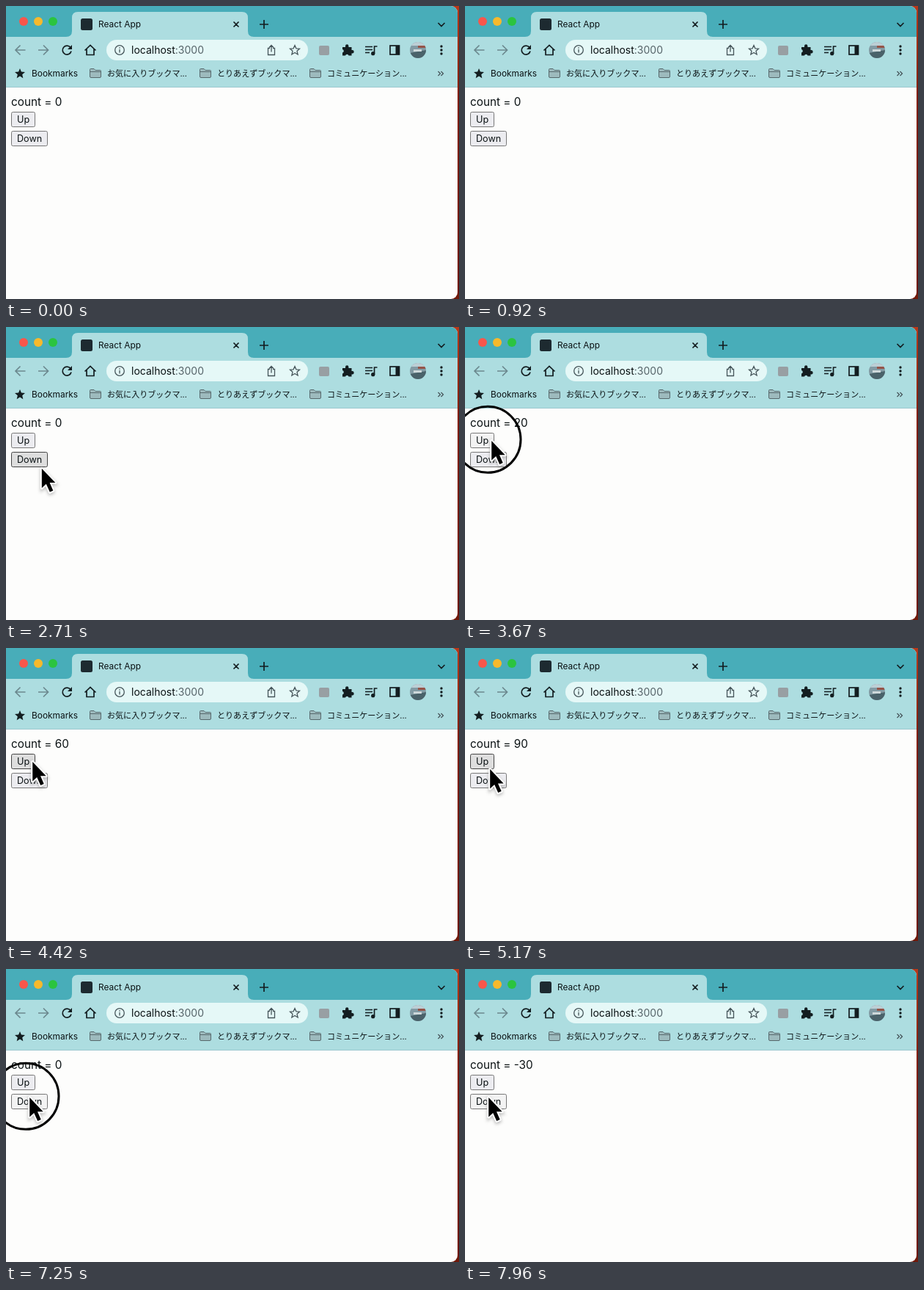
Animation of 618x399 px, one loop 8000 ms. Source, as an HTML page:

```html
<!DOCTYPE html>
<html lang="ja">
<head>
<meta charset="utf-8">
<title>Counter</title>
<style>
  html, body { margin: 0; width: 100%; height: 100%; overflow: hidden; background: #7a1e0a; }
  svg { display: block; width: 618px; height: 399px; }
  text { font-family: Inter, "Noto Sans CJK JP", "Noto Sans CJK", sans-serif; fill: #0b1214; }
  .line { fill: none; stroke: #131d20; stroke-width: 1.7; }
  .dim { stroke: #6c898f; }
  .thin { stroke-width: 1.3; stroke: #46555a; }
  .dark { fill: #131d20; }
  .mark { font-size: 11.05px; }
</style>
</head>
<body>
<svg viewBox="0 0 618 399">
  <defs>
    <linearGradient id="desk" x2="0" y2="1">
      <stop offset="0" stop-color="#b8391a"/>
      <stop offset=".3" stop-color="#84200c"/>
      <stop offset="1" stop-color="#70190a"/>
    </linearGradient>
    <clipPath id="win"><rect x="-12" width="628" height="399" rx="9"/></clipPath>
    <clipPath id="face"><circle cx="562" cy="60" r="11"/></clipPath>
    <filter id="soft" x="-60%" y="-40%" width="220%" height="200%">
      <feGaussianBlur stdDeviation="2"/>
    </filter>
    <path id="arrow" d="M0 0V26.5L6 21L11 32L15.500 30L10.800 19.300H18.500Z"/>
    <g id="folder">
      <path d="M.5 11V1.500Q.5 .5 1.500 .5H6L8 2.500H14.500Q15.500 2.500 15.500 3.500V11Q15.500 12.500 14 12.500H2Q.5 12.500 .5 11Z" fill="#9dbabd" stroke="#56686c"/>
      <path d="M.5 4.500H15.500" stroke="#56686c"/>
    </g>
  </defs>

  <rect width="618" height="399" fill="url(#desk)"/>
  <g clip-path="url(#win)">
    <rect width="616" height="399" fill="#fdfdfc"/>
    <rect width="616" height="42" fill="#48adb9"/>
    <rect y="42" width="616" height="68" fill="#addde0"/>
    <rect y="110" width="616" height="1" fill="#9cc8cf"/>
    <path d="M82 42Q90 42 90 34V16Q90 8 98 8H322Q330 8 330 16V34Q330 42 338 42Z" fill="#addde0"/>

    <circle cx="24" cy="21" r="6" fill="#f9564b"/>
    <circle cx="44" cy="21" r="6" fill="#f7b92c"/>
    <circle cx="64" cy="21" r="6" fill="#2bc43f"/>
    <rect x="102" y="17" width="16" height="16" rx="2.500" fill="#1d2a30"/>
    <text x="126" y="29" font-size="11.9">React App</text>
    <path class="line" d="M310.500 21.500L317.500 28.500M317.500 21.500L310.500 28.500M346 25H358M352 19V31M589.500 23L594 27.500L598.500 23"/>

    <path class="line dim" d="M26.500 60H13M19.500 53.500L13 60L19.500 66.500M44 60H57.500M51 53.500L57.500 60L51 66.500"/>
    <path class="line" d="M88 56.500A6 6 0 1 0 89 61.500"/>
    <path class="dark" d="M90 53V59H84Z"/>
    <path class="line" d="M107.500 60.500L115 53.500L122.500 60.500M110 58.500V66.500H120V58.500"/>

    <rect x="137" y="46" width="275" height="28" rx="14" fill="#e5f8f7"/>
    <circle class="line thin" cx="155" cy="60" r="6.300"/>
    <path class="line thin" d="M155 59V63.500M155 56.300V57.800"/>
    <text x="171" y="65" font-size="14">localhost<tspan fill="#566469">:3000</tspan></text>
    <path class="line thin" d="M360 57.500H357.500V66.500H366.500V57.500H364M362 62.500V53.500M359 56.500L362 53.500L365 56.500"/>
    <path class="line thin" d="M394 53.500L395.900 57.800L400.500 58.200L397 61.300L398.100 66L394 63.500L389.900 66L391 61.300L387.500 58.200L392.100 57.800Z"/>

    <rect x="427" y="54" width="14" height="13" rx="2" fill="#989fa3"/>
    <path class="dark" d="M459 56H463V54.500A2.200 2.200 0 0 1 467.400 54.500V56H471.500V60H472.500A2.200 2.200 0 0 1 472.500 64.400H471.500V67.500H467.500A2.300 2.300 0 0 0 463 67.500H459V63.500A2.300 2.300 0 0 0 459 59Z"/>
    <path class="line" d="M490 55.500H500M490 59.500H500M490 63.500H496M502.500 65V55H506.500"/>
    <circle class="dark" cx="500.700" cy="64.700" r="2.600"/>
    <rect class="line" x="524" y="54" width="12.500" height="12"/>
    <rect class="dark" x="531.500" y="54" width="5" height="12"/>
    <g clip-path="url(#face)">
      <rect x="551" y="49" width="22" height="22" fill="#829ba4"/>
      <rect x="551" y="49" width="22" height="5" fill="#bccfd5"/>
      <rect x="562" y="54" width="11" height="3" fill="#945448"/>
      <path d="M551 64L573 60V71H551Z" fill="#4a626a"/>
      <rect x="556" y="59" width="11" height="3" fill="#ced8da"/>
    </g>
    <g class="dark">
      <circle cx="594" cy="55" r="1.700"/><circle cx="594" cy="60" r="1.700"/><circle cx="594" cy="65" r="1.700"/>
    </g>

    <path class="dark" d="M19 85L20.900 89.600L26 90L22.200 93.300L23.300 98.200L19 95.600L14.700 98.200L15.800 93.300L12 90L17.100 89.600Z"/>
    <text x="35" y="96" font-size="11.9">Bookmarks</text>
    <use href="#folder" x="114" y="85"/>
    <text class="mark" x="138" y="96">お気に入りブックマ...</text>
    <use href="#folder" x="264" y="85"/>
    <text class="mark" x="288" y="96">とりあえずブックマ...</text>
    <use href="#folder" x="414" y="85"/>
    <text class="mark" x="438" y="96">コミュニケーション...</text>
    <path class="line thin" d="M589.500 89L592.500 92L589.500 95M593.500 89L596.500 92L593.500 95"/>

    <text id="count" x="7" y="136" font-size="15.3"></text>
    <rect id="up" x="7.500" y="144.500" width="32" height="20" rx="2"/>
    <text x="15" y="159" font-size="12.7">Up</text>
    <rect id="down" x="7.500" y="170.500" width="49" height="20" rx="2"/>
    <text x="15" y="185" font-size="12.6">Down</text>

    <g id="pointer">
      <circle id="ring" cx="-4" cy=".3" r="45" fill="none" stroke="#000" stroke-width="3"/>
      <g transform="translate(1.2 2)">
        <use href="#arrow" y="2" fill="#777" stroke="#777" stroke-width="4" opacity=".5" filter="url(#soft)"/>
        <use href="#arrow" stroke="#fff" stroke-width="4" stroke-linejoin="round" paint-order="stroke"/>
      </g>
    </g>
  </g>
</svg>
<script>
const LOOP = 8000, HOLD = 100, RING_LAG = 35;
const $ = id => document.getElementById(id);

const upPresses = Array.from({ length: 9 }, (_, k) => 3190 + 215 * k);
const downPresses = Array.from({ length: 13 }, (_, k) => 5300 + 212 * k + 30 * Math.max(0, k - 9));

// time, x, y of the pointer tip
const path = [
  [1450, 125, 405], [1750, 98, 337], [1960, 86, 299], [2400, 64, 240], [2950, 35, 153],
  [5040, 35, 153], [5170, 33, 163], [5280, 31, 173], [LOOP, 31, 173]
];

function tipAt(t) {
  const i = path.findIndex(p => p[0] >= t);
  if (i < 1) return path[0].slice(1);
  const [t0, x0, y0] = path[i - 1], [t1, x1, y1] = path[i];
  const u = (t - t0) / (t1 - t0);
  return [x0 + (x1 - x0) * u, y0 + (y1 - y0) * u];
}

const held = (list, t) => list.some(p => t >= p && t < p + HOLD);
const released = (list, t) => list.filter(p => t >= p + HOLD).length;

function paintButton(id, right, top, [x, y], active) {
  const hover = x >= 7 && x <= right && y >= top && y <= top + 21;
  $(id).setAttribute("fill", active ? "#f3f3f3" : hover ? "#dedede" : "#ececf0");
  $(id).setAttribute("stroke", hover && !active ? "#444" : "#777");
}

function draw(t) {
  const tip = tipAt(t);
  const ringTime = t - RING_LAG;
  $("count").textContent = "count = " + 10 * (released(upPresses, t) - released(downPresses, t));
  paintButton("up", 40, 144, tip, held(upPresses, t));
  paintButton("down", 57, 170, tip, held(downPresses, t));
  $("pointer").setAttribute("transform", `translate(${tip})`);
  $("pointer").setAttribute("visibility", t < path[0][0] ? "hidden" : "visible");
  $("ring").setAttribute("opacity", held(upPresses, ringTime) || held(downPresses, ringTime) ? 1 : 0);
}

function tick() {
  draw(performance.now() % LOOP);
  requestAnimationFrame(tick);
}
tick();
</script>
</body>
</html>
```
